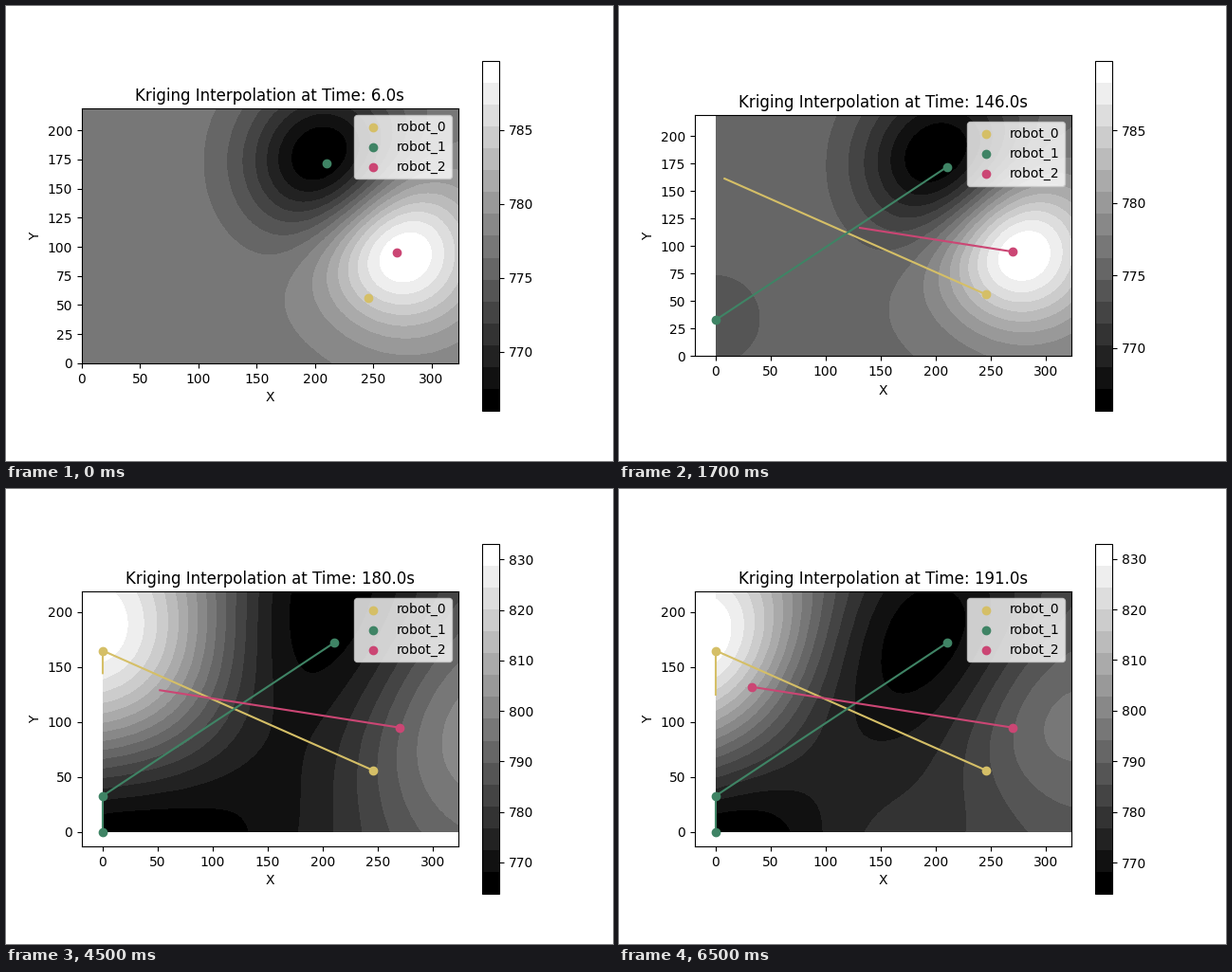
Animation of 640x480 px, one loop 8000 ms. Source, as a matplotlib script:

```python
import numpy as np
import matplotlib.pyplot as plt
from matplotlib.animation import FuncAnimation

INTERVAL = 500
FRAMES = 16
WIDTH, HEIGHT = 323, 219
COLORS = ["#d5bf67", "#3f8465", "#cb4674"]

# x, y, measured value, robot; in the order the samples were taken
SAMPLES = np.array([
    (246, 56, 784.57, 0),
    (210, 172, 766.33, 1),
    (270, 95, 789.43, 2),
    (0, 33, 774.25, 1),
    (0, 165, 831.0, 0),
    (0, 0, 763.9, 1),
    (33, 132, 809.0, 2),
])

# Each survey step: first animation frame, clock, number of samples,
# squared kernel length, colour limits, axis origin, robot positions
STEPS = [
    dict(start=0, clock=6.0, count=3, length2=4600, limits=(766.0, 789.7),
         origin=(0, 0), robots=[(246, 56), (210, 172), (270, 95)]),
    dict(start=1, clock=146.0, count=4, length2=5600, limits=(765.68, 789.79),
         origin=(-18.95, 0), robots=[(8, 161.5), (0, 33), (131, 116.7)]),
    dict(start=5, clock=155.0, count=5, length2=15000, limits=(765.4, 832.6),
         origin=(-18.95, 0), robots=[(0, 165), (0, 33), (111, 119.8)]),
    dict(start=9, clock=180.0, count=6, length2=20000, limits=(763.76, 833.17),
         origin=(-18.95, -12.9), robots=[(0, 144.5), (0, 0), (52, 129)]),
    dict(start=13, clock=191.0, count=7, length2=11000, limits=(763.8, 833.0),
         origin=(-18.95, -12.9), robots=[(0, 125), (0, 0), (33, 132)]),
]

GRID_X, GRID_Y = np.meshgrid(np.arange(WIDTH + 1), np.arange(HEIGHT + 1))


def krige(samples, length2):
    """Ordinary kriging with a Gaussian covariance."""
    x, y, value = samples[:, :3].T
    n = len(samples)

    def covariance(px, py):
        dist2 = (px[..., None] - x) ** 2 + (py[..., None] - y) ** 2
        return np.exp(-dist2 / length2)

    system = np.ones((n + 1, n + 1))
    system[:n, :n] = covariance(x, y)
    system[n, n] = 0
    weights = np.linalg.solve(system, np.append(value, 0))
    return covariance(GRID_X, GRID_Y) @ weights[:n] + weights[n]


FIELDS = [krige(SAMPLES[:s["count"]], s["length2"]) for s in STEPS]

fig = plt.figure(figsize=(6.4, 4.8), dpi=100)


def update(frame):
    index = sum(s["start"] <= frame for s in STEPS) - 1
    step = STEPS[index]
    samples = SAMPLES[:step["count"]]
    low, high = step["limits"]

    fig.clear()
    ax = fig.add_subplot()
    image = ax.imshow(FIELDS[index], origin="lower", vmin=low, vmax=high,
                      extent=(0, WIDTH, 0, HEIGHT),
                      cmap=plt.get_cmap("gray", 16))
    fig.colorbar(image, ax=ax)

    for robot, color in enumerate(COLORS):
        points = samples[samples[:, 3] == robot, :2]
        path = np.vstack([points, step["robots"][robot]])
        ax.scatter(*points.T, color=color, label=f"robot_{robot}")
        ax.plot(*path.T, color=color)

    ax.set_xlim(step["origin"][0], WIDTH)
    ax.set_ylim(step["origin"][1], HEIGHT)
    ax.set_xlabel("X")
    ax.set_ylabel("Y")
    ax.set_title(f"Kriging Interpolation at Time: {step['clock']}s")
    ax.legend(loc="upper right")
    return []


anim = FuncAnimation(fig, update, frames=FRAMES, interval=INTERVAL,
                     repeat=True, repeat_delay=0, blit=False)
plt.show()
```
